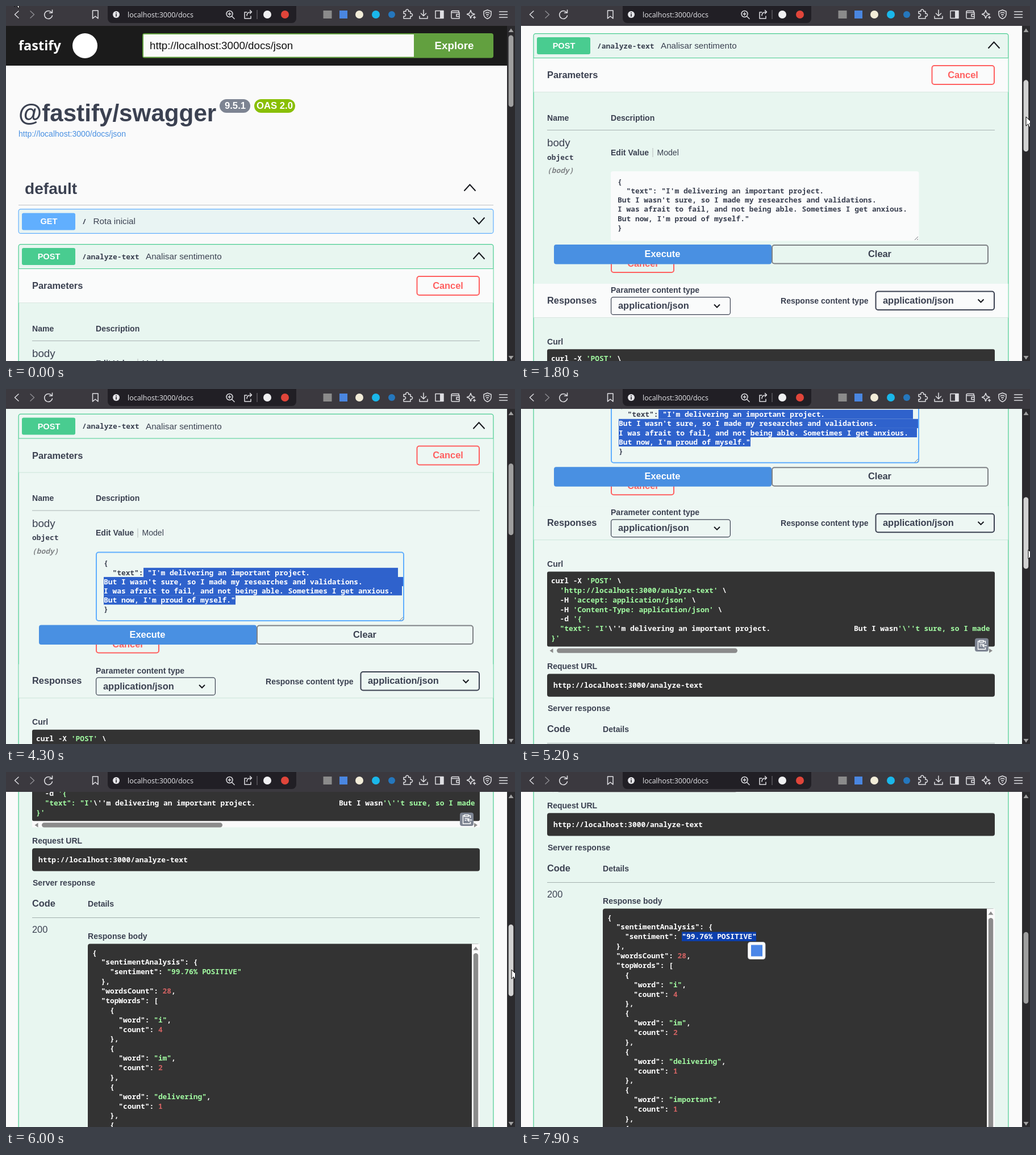
An HTML page for the animation above (8 s loop, 896 by 625 pixels).

```html
<!DOCTYPE html>
<html lang="en">
<head>
<meta charset="utf-8">
<title>API docs walkthrough</title>
<style>
html, body { margin: 0; width: 100%; height: 100%; overflow: hidden; background: #fafafa; }
svg { display: block; }
#stage { --page: #fafafa; --block: #e8f6f0; --get: #e9f4f3; --head: #fafbfb; --edge: #d9e6e0; }
#stage.tint { --page: #edf7f3; --block: #edf7f3; --get: #edf7f3; --head: #edf7f3; --edge: #cbe6da; }
text { font-family: "Liberation Sans", Arial, sans-serif; white-space: pre; }
text.b { font-weight: 700; }
text.m { font: 700 12.88px "Noto Sans Mono", monospace; }
text.ui { font-family: "Open Sans", sans-serif; }
.icon { fill: none; stroke: #dedee2; stroke-width: 1.5; stroke-linecap: round; stroke-linejoin: round; }
.g { fill: #a2fca2; }
.n { fill: #d36363; }
</style>
</head>
<body>
<svg id="stage" width="896" height="625" viewBox="0 0 896 625"></svg>
<script>
const INK = '#3b4151', GREEN = '#49cc90', BLUE = '#61affe', RED = '#ff6060', DARK = '#333333';

const rect = (x, y, w, h, fill, more = '') =>
  `<rect x="${x}" y="${y}" width="${w}" height="${h}" fill="${fill}" ${more}/>`;
const frame = (x, y, w, h, color, width, fill = 'none') =>
  rect(x + width / 2, y + width / 2, w - width, h - width, fill, `rx="4" stroke="${color}" stroke-width="${width}"`);
const text = (x, y, str, size = 14.06, cls = 'b', fill = INK, more = '') =>
  `<text x="${x}" y="${y}" font-size="${size}" class="${cls}" fill="${fill}" ${more}>${str}</text>`;
const centered = (x, y, str, size, fill) => text(x, y, str, size, 'b', fill, 'text-anchor="middle"');
const mono = (x, y, str, fill = '#fff', more = '') => text(x, y, str, 12.88, 'm', fill, more);
const line = (x1, y, x2, color) => rect(x1, y, x2 - x1, 1, color);
const path = (d, color, width = 2, fill = 'none') =>
  `<path d="${d}" fill="${fill}" stroke="${color}" stroke-width="${width}"/>`;
const chevron = (x, y, w, h, width = 2) => path(`M${x - w} ${y - h / 2}l${w} ${h} ${w} ${-h}`, '#16181d', width);
const dot = (x, y, r, fill) => `<circle cx="${x}" cy="${y}" r="${r}" fill="${fill}"/>`;
const icon = d => `<path class="icon" d="${d}"/>`;
const str = s => `<tspan class="g">${s}</tspan>`;
const num = n => `<tspan class="n">${n}</tspan>`;

// Text whose highlighted part is revealed through a clip rectangle.
const highlight = (id, x, y, s, left, right, color) =>
  `<clipPath id="${id}"><rect y="${y - 13}" width="0" height="17"/></clipPath>
   <g clip-path="url(#${id})">${rect(left, y - 12.9, right - left, 16.4, color)}${mono(x, y, s)}</g>`;

const message = [
  '{',
  '  "text": "I\'m delivering an important project.',
  "But I wasn't sure, so I made my researches and validations.",
  'I was afrait to fail, and not being able. Sometimes I get anxious.',
  'But now, I\'m proud of myself."',
  '}'
];
const bands = [[240, 688], [170, 697], [170, 695], [170, 402]];
const messageY = i => 684.8 + 16.2 * i;

const curl = [
  `curl -X ${str("'POST'")} \\`,
  `  ${str("'http://localhost:3000/analyze-text'")} \\`,
  `  -H ${str("'accept: application/json'")} \\`,
  `  -H ${str("'Content-Type: application/json'")} \\`,
  `  -d ${str("'{")}`,
  `  ${str('"text": "I\'')}\\''m delivering an important project.`,
  str("}'")
];

const words = [['i', 4], ['im', 2], ['delivering', 1], ['important', 1], ['project', 1]];
const response = [
  '{',
  '  "sentimentAnalysis": {',
  `    "sentiment": ${str('"99.76% POSITIVE"')}`,
  '  },',
  `  "wordsCount": ${num(28)},`,
  '  "topWords": [',
  ...words.flatMap(([w, n]) => [
    '    {', `      "word": ${str(`"${w}"`)},`, `      "count": ${num(n)}`, '    },'
  ])
];
const responseY = i => 1343.6 + 16.87 * i;

const header =
  rect(0, 35, 882, 70, '#1b1b1b') +
  text(22, 78, 'fastify', 23.5, 'b ui', '#fff') + dot(139, 70, 22, '#fff') +
  rect(240, 48, 618, 43.5, '#62a03f', 'rx="4"') + rect(242, 50, 476, 39.5, '#fafafa') +
  text(253, 76, 'http://localhost:3000/docs/json', 18.75, '', '#111') +
  centered(789, 76, 'Explore', 18.75, '#fff') +
  text(22, 203, '@fastify/swagger', 42.2) +
  rect(376, 164, 54, 24, '#7d8492', 'rx="12"') + centered(403.5, 181.3, '9.5.1', 16.7, '#fff') +
  rect(437, 164, 72, 24, '#89bf04', 'rx="12"') + centered(473, 181.3, 'OAS 2.0', 16.7, '#fff') +
  text(22, 229.7, 'http://localhost:3000/docs/json', 14.06, '', '#4990e2') +
  text(33, 331, 'default', 28.1) + chevron(816.5, 320, 10, -11) + line(22, 350, 858, '#bfc2c6');

const routes =
  frame(21.5, 357, 837, 44, BLUE, 1.2, 'var(--get)') +
  rect(28, 364.5, 94, 30, BLUE, 'rx="3"') + centered(75.5, 384.2, 'GET', 14.6, '#fff') +
  mono(134, 384, '/', INK) + text(153.5, 384.3, 'Rota inicial', 15.23, '') + chevron(832.5, 378, 10, 11) +
  frame(21.5, 419, 837, 1600, GREEN, 1.2, 'var(--block)') +
  rect(28, 426, 94, 30, GREEN, 'rx="3"') + centered(75.5, 446, 'POST', 14.6, '#fff') +
  mono(134, 445.5, '/analyze-text', INK) + text(246, 446, 'Analisar sentimento', 15.23, '') +
  chevron(832.5, 440, 10, -11) +
  rect(22.5, 463, 835, 59, 'var(--head)') + line(22.5, 462, 857.5, GREEN) + line(22.5, 522, 857.5, 'var(--edge)') +
  text(46, 498, 'Parameters', 16.4) +
  frame(722.5, 475, 111.5, 35, RED, 2) + centered(778, 497.7, 'Cancel', 16.4, RED) +
  text(46, 572.6, 'Name') + text(158, 572.6, 'Description') + line(46, 589, 834, '#a9b3b3') +
  text(46, 618, 'body', 18.75, '') + mono(46, 641.8, 'object', INK) +
  mono(46, 665, '(body)', '#808486', 'font-style="italic" style="font-style:italic"') +
  text(158, 633.5, 'Edit Value') + rect(231.5, 621, 1, 16, '#b5bcbc') + text(239.5, 633.5, 'Model', 14.06, '');

const editor =
  rect(158, 662, 542.5, 122.5, 'var(--head)', 'rx="4"') +
  `<g id="focusRing">${frame(158, 662, 543, 122.5, BLUE, 2)}</g><g id="message">` +
  message.map((s, i) => mono(170, messageY(i), s, INK)).join('') +
  bands.map(([l, r], i) => highlight('band' + i, 170, messageY(i + 1), message[i + 1], l, r, '#2f62cc')).join('') +
  '</g>' + path('M693 783l6-6M697 783l2-2', '#70757a', 1) +
  frame(158, 806.5, 112, 34.5, RED, 2) + centered(214, 830, 'Cancel', 16.4, RED) +
  rect(58, 791, 383, 34.5, '#4990e2', 'rx="4" id="execute"') + centered(249, 813.2, 'Execute', 16.4, '#fff') +
  frame(441, 791, 382, 34.5, '#7f8286', 2) + centered(631.5, 813.2, 'Clear', 16.4, INK);

const responses =
  rect(22.5, 860, 835, 59, 'var(--head)') + line(22.5, 919, 857.5, 'var(--edge)') +
  text(46, 894.7, 'Responses', 16.4) + text(158, 876, 'Parameter content type') +
  frame(158, 883, 211, 32, INK, 1.2) + text(171, 904, 'application/json', 16.4) + chevron(345, 899, 5, 5) +
  text(457, 895, 'Response content type') +
  frame(623.5, 872.5, 210.5, 34.5, INK, 2) + text(637, 894.7, 'application/json', 16.4) + chevron(809.5, 890, 5, 5) +
  text(46, 966.8, 'Curl') + rect(46, 975.3, 788, 143, 'var(--page)') +
  rect(46, 975.3, 788, 132, DARK, 'rx="3"') +
  curl.map((s, i) => mono(53, 995.8 + 16.87 * i, s)).join('') +
  mono(586, 995.8 + 16.87 * 5, `But I wasn${str("'\\''t sure, so I made")}`) +
  rect(63, 1110.2, 318, 8.4, '#8b8b8b', 'rx="4.2"') +
  path('M56.5 1110.5v8l-6-4zM824 1110.5v8l6-4z', 'none', 0, '#8b8b8b') +
  rect(799, 1092.5, 24, 23.5, '#7d8492', 'rx="4"') +
  path('M807 1098h-2.5v14h13v-3.5M814 1098h3.5v4M807 1096.5h7v3h-7zM807.5 1103h6M807.5 1106h3M820 1105.5h-7.5m3-3l-3 3 3 3', '#fff', 1.4) +
  text(46, 1146.8, 'Request URL') + rect(46, 1155.3, 788, 40.2, DARK, 'rx="4"') +
  mono(57, 1180.2, 'http://localhost:3000/analyze-text') +
  text(47, 1220.8, 'Server response') + text(46, 1258.3, 'Code', 16.4) + text(144, 1258.3, 'Details') +
  line(46, 1277, 834, '#a3b0ae') + text(46, 1304, '200', 16.4, '') + text(144, 1314.5, 'Response body') +
  rect(144, 1323.5, 690, 500, DARK, 'rx="4"') + rect(820, 1323.5, 14, 500, '#fafafa') +
  path('M822.5 1334.5h9l-4.5-6z', 'none', 0, '#8b8b8b') + rect(822.8, 1340, 8.4, 480, '#8b8b8b', 'rx="4.2"') +
  response.map((s, i) => mono(152, responseY(i), s)).join('') +
  highlight('result', 152, responseY(2), '    "sentiment": "99.76% POSITIVE"', 283, 414, '#0b3fae');

const toolbar =
  rect(0, 0, 896, 35, '#3b393f') + rect(179, -8, 332, 38, '#211f25', 'rx="8"') +
  icon('M22 9l-6.5 6 6.5 6') + `<g opacity=".5">${icon('M43 9l6.5 6-6.5 6')}</g>` +
  icon('M80 11a7 7 0 1 0 1.5 6M81.5 7v5h-5M152.500 8h9.500v14l-4.800-4-4.700 4z') +
  dot(194, 15, 6, '#e4e4e8') + rect(193.2, 14, 1.6, 4.5, '#211f25') + rect(193.2, 11.3, 1.6, 1.6, '#211f25') +
  text(214, 19.6, 'localhost:3000/docs', 12.5, 'ui', '#e6e6ea') +
  icon('M398 18.500l4 4M388 14a5.500 5.500 0 1 0 11 0a5.500 5.500 0 1 0-11 0M391 14h5M393.500 11.500v5') +
  icon('M424 11h-4v11h11v-4M424 17c0-5 3-6.500 8-6.500M429.500 7.500l3 3-3 3') +
  rect(441.5, 7, 1, 16, '#77757d') +
  dot(460, 15, 7, '#f0f0f2') + dot(491, 15, 7, '#e0453a') +
  rect(558.5, 8, 15, 14, '#8b8b8b') + rect(587, 8, 14, 14, '#4a86e0') +
  dot(622, 15, 7, '#f2ecd8') + dot(651, 15, 7, '#1ab7ea') + dot(679, 15, 6, '#2577bd') +
  icon('M700 9.500h4a2.500 2.500 0 1 1 4.500 0h3.500v4a2.500 2.500 0 1 1 0 4.500v4h-12v-4a2.500 2.500 0 1 0 0-4.500z') +
  icon('M735 7v10M730.500 13l4.500 4.500 4.500-4.500M728 18v4h14v-4') +
  icon('M756 8.500h14v13h-14z') + rect(764, 8.5, 6, 13, '#dedee2') +
  icon('M797 10.500v-2h-11a2 2 0 0 0-2 2v10a1.500 1.500 0 0 0 1.500 1.500H798V11.500h-13M798 14.500h-5v4h5') +
  icon('M818 7.500l2 5 5 2-5 2-2 5-2-5-4.500-2 4.500-2zM824.500 18v4M822.500 20h4') +
  icon('M847.500 7l6.500 2.500v5c0 4-3 6.500-6.500 8-3.500-1.500-6.500-4-6.500-8v-5zM844 12.500q3.500-2.500 7 0M845.500 15.500q2-1.500 4 0') +
  dot(847.5, 18, 1, '#dedee2') + icon('M868.500 10h14M868.500 15h14M868.500 20h14');

const scrollbar =
  rect(882, 35, 14, 590, '#2b2a2d') +
  path('M884.5 46h9l-4.500-6.500zM884.500 616h9l-4.500 6.500z', 'none', 0, '#a0a0a0') +
  rect(884.6, 51.5, 8.6, 126, '#9f9f9f', 'rx="4.3" id="thumb"');

const overlay =
  `<g id="popup">${rect(399.5, 299.5, 30.5, 30, '#fafafa', 'rx="4" stroke="#c9ccd2"')}${rect(405, 304.5, 20, 20, '#4a86e8')}</g>
   <g id="cursor">
     <path id="arrow" d="M0 0v16.200l3.700-3.500 2.500 5.900 2.600-1.100-2.500-5.800h5.200z" fill="#fff" stroke="#000"/>
     <path id="beam" d="M-3-8h2l1 1 1-1h2M0-7V7M-3 8h2l1-1 1 1h2" fill="none" stroke="#222"/>
   </g>`;

const stage = document.getElementById('stage');
stage.innerHTML = rect(0, 0, 896, 625, 'var(--page)') +
  `<g id="page">${header + routes + editor + responses}</g>` + toolbar + scrollbar + overlay;
const $ = id => document.getElementById(id);

// Tables of [time, values...]
const scrollSteps = [[1100, 0], [1200, 20], [1300, 53.3], [1500, 170], [1700, 325], [1800, 371], [1900, 375.5],
  [4800, 375.5], [5000, 510], [5200, 653.8], [5300, 740], [5500, 865], [5800, 980], [6000, 1021], [6200, 1083]];
const cursorSteps = [[100, 15, -15], [200, 60, 10], [500, 700, 105], [700, 887, 122], [1100, 887, 124],
  [1300, 887, 142], [1800, 889, 195], [2000, 889, 196], [2300, 448, 428], [2500, 436, 436], [2700, 415, 425],
  [3000, 404, 375], [3300, 404, 371], [3800, 450, 323], [4000, 310, 323], [4100, 242, 323], [4200, 857, 261],
  [4700, 872, 250], [4800, 892, 222], [5200, 893, 283], [6000, 890, 348], [6200, 890, 361], [6300, 720, 358],
  [6400, 540, 351], [6600, 336, 320], [6700, 336, 320], [7000, 415, 290], [7400, 284, 290], [7600, 310, 220]];
const selectSteps = [[3300, 4], [3800, 0.5], [3900, 0.5], [4100, 0]];
const resultSteps = [[7000, 0], [7400, 1]];

function at(steps, t) {
  const i = steps.findIndex(s => s[0] > t);
  if (i === 0) return steps[0].slice(1);
  if (i < 0) return steps[steps.length - 1].slice(1);
  const a = steps[i - 1], b = steps[i], k = (t - a[0]) / (b[0] - a[0]);
  return a.slice(1).map((v, j) => v + (b[j + 1] - v) * k);
}
const within = (t, a, b) => t >= a && t < b;
const show = (id, on) => { $(id).style.display = on ? '' : 'none'; };
function reveal(id, from, to) {
  const r = $(id).firstElementChild;
  r.setAttribute('x', from);
  r.setAttribute('width', Math.max(0, to - from));
}

function draw(t) {
  const [scroll] = at(scrollSteps, t), [x, y] = at(cursorSteps, t);
  const [left] = at(selectSteps, t), [picked] = at(resultSteps, t);
  const focused = t >= 3300;
  $('page').setAttribute('transform', `translate(0 ${-scroll})`);
  $('thumb').setAttribute('y', 51.5 + scroll * 0.2126);
  $('thumb').setAttribute('fill', within(t, 900, 2100) || within(t, 4800, 6300) ? '#d2d2d2' : '#9f9f9f');
  stage.classList.toggle('tint', focused && scroll < 720);

  show('focusRing', focused);
  $('message').setAttribute('transform', focused ? 'translate(2 2)' : '');
  bands.forEach(([l, r], i) => reveal('band' + i, l + (r - l) * Math.min(1, Math.max(0, left - i)), r));
  reveal('result', 414 - 131 * picked, 414);
  show('popup', t >= 7800);

  const beam = within(t, 2900, 4200) || within(t, 6900, 7500);
  show('cursor', !within(t, 4300, 4700) && t < 7800);
  show('arrow', !beam);
  show('beam', beam);
  $('cursor').setAttribute('transform', `translate(${x} ${y})`);
  $('execute').setAttribute('fill', within(t, 2500, 2800) ? '#4488d6' : '#4990e2');
}

const start = performance.now();
function tick() {
  const t = (performance.now() - start) % 8000;
  draw(Math.floor(t / 100) * 100);
  requestAnimationFrame(tick);
}
tick();
</script>
</body>
</html>
```
